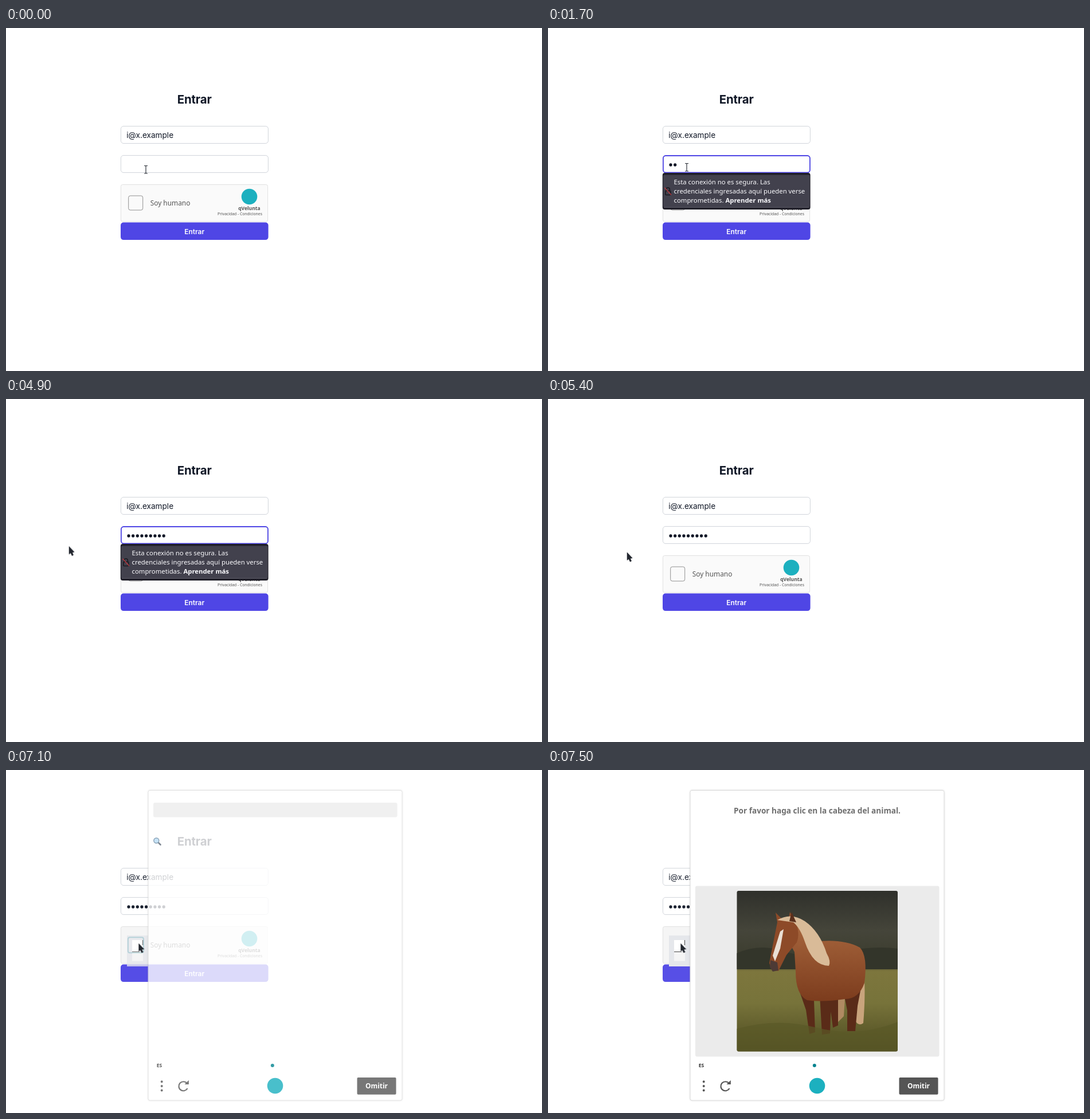
An HTML page that plays this animation: 935x599 px, repeating every 8000 ms.

```html
<!DOCTYPE html>
<html lang="es">
<head>
<meta charset="utf-8">
<title>Entrar</title>
<style>
html, body { margin: 0; width: 100%; height: 100%; overflow: hidden; background: #fff; }
svg { display: block; width: 935px; height: 599px; }
text { font-family: "Noto Sans", "Open Sans", sans-serif; }
.inter { font-family: Inter, "Liberation Sans", sans-serif; }
.bold { font-weight: 700; }
.mid { text-anchor: middle; }
.small { fill: #555; }
.field { fill: #fff; stroke: #d1d5db; }

/* One 8 s clock for every part; all changes are hard steps */
.anim { animation: 8s step-end -10ms infinite; }
#cover { animation-name: type; }
#caret { animation-name: caret; }
#ring { animation-name: ring; }
#tip { animation-name: tip; }
#ibeam { animation-name: ibeam; }
#arrow { animation-name: arrow; }
#widget { animation-name: hover; }
#check { animation-name: check; }
#pulse { animation-name: pulse; }
#modal { animation-name: modal; }
#loading { animation-name: loading; }
#task { animation-name: task; }

@keyframes type {
  0% { transform: none; }
  18.75% { transform: translateX(7.65px); }
  21.25% { transform: translateX(15.3px); }
  23.75% { transform: translateX(22.95px); }
  27.5% { transform: translateX(30.6px); }
  38.75% { transform: translateX(38.25px); }
  41.25% { transform: translateX(45.9px); }
  43.75% { transform: translateX(53.55px); }
  47.5% { transform: translateX(61.2px); }
  51.25%, 100% { transform: translateX(68.85px); }
}
@keyframes caret {
  0% { opacity: 0; transform: none; }
  6.25% { opacity: 1; transform: none; }
  18.75% { opacity: 1; transform: translateX(7.65px); }
  21.25% { opacity: 0; transform: translateX(15.3px); }
  23.75% { opacity: 1; transform: translateX(22.95px); }
  27.5% { opacity: 1; transform: translateX(30.6px); }
  37.5% { opacity: 0; transform: translateX(30.6px); }
  38.75% { opacity: 1; transform: translateX(38.25px); }
  41.25% { opacity: 1; transform: translateX(45.9px); }
  43.75% { opacity: 1; transform: translateX(53.55px); }
  47.5% { opacity: 1; transform: translateX(61.2px); }
  51.25% { opacity: 1; transform: translateX(68.85px); }
  52.5%, 100% { opacity: 0; transform: translateX(68.85px); }
}
@keyframes ring {
  0% { opacity: 0; }
  6.25% { opacity: 1; }
  63.75%, 100% { opacity: 0; }
}
@keyframes tip {
  0% { opacity: 0; }
  6.25% { opacity: .6; }
  7.5% { opacity: 1; }
  63.75%, 100% { opacity: 0; }
}
@keyframes ibeam {
  0% { opacity: 1; transform: translate(244px, 247px); }
  1.25% { opacity: 1; transform: translate(243px, 245px); }
  2.5% { opacity: 1; transform: translate(242px, 243px); }
  57.5% { opacity: 1; transform: translate(226px, 244px); }
  58.75%, 100% { opacity: 0; transform: translate(226px, 244px); }
}
@keyframes arrow {
  0% { opacity: 0; transform: translate(165px, 250px); }
  58.75% { opacity: 1; transform: translate(165px, 250px); }
  60% { opacity: 1; transform: translate(121px, 256px); }
  61.25% { opacity: 1; transform: translate(110px, 257.5px); }
  67.5% { opacity: 1; transform: translate(138px, 268px); }
  68.75% { opacity: 1; transform: translate(203px, 292px); }
  70%, 100% { opacity: 1; transform: translate(231.5px, 303px); }
}
@keyframes hover {
  0% { fill: #fafafa; }
  68.75%, 100% { fill: #f5f5f5; }
}
@keyframes check {
  0% { opacity: 0; }
  75%, 100% { opacity: 1; }
}
@keyframes pulse {
  0% { r: 0; }
  75% { r: 1px; }
  76.25% { r: 2.5px; }
  77.5% { r: 4.5px; }
  78.75% { r: 6.3px; }
  80% { r: 7.5px; }
  81.25% { r: 6.3px; }
  82.5% { r: 4.5px; }
  83.75% { r: 2.5px; }
  85% { r: 4.5px; }
  86.25%, 100% { r: 0; }
}
@keyframes modal {
  0% { opacity: 0; }
  86.25% { opacity: .25; }
  87.5% { opacity: .55; }
  88.75% { opacity: .8; }
  90% { opacity: .95; }
  91.25%, 100% { opacity: 1; }
}
@keyframes loading {
  0% { opacity: 1; }
  93.75%, 100% { opacity: 0; }
}
@keyframes task {
  0% { opacity: 0; }
  93.75%, 100% { opacity: 1; }
}
</style>
</head>
<body>
<svg viewBox="0 0 935 599">
  <defs>
    <linearGradient id="scene" x2="0" y2="1">
      <stop offset="0" stop-color="#2f302b"/>
      <stop offset=".25" stop-color="#45453a"/>
      <stop offset=".45" stop-color="#3a3b2c"/>
      <stop offset=".5" stop-color="#7d763d"/>
      <stop offset=".7" stop-color="#77733a"/>
      <stop offset="1" stop-color="#4c4a20"/>
    </linearGradient>
    <linearGradient id="coat" x2="0" y2="1">
      <stop offset="0" stop-color="#a9683f"/>
      <stop offset="1" stop-color="#7c3c1d"/>
    </linearGradient>
    <filter id="shade" x="-5%" y="-5%" width="110%" height="110%">
      <feDropShadow dx="0" dy="0" stdDeviation="1.5" flood-opacity=".12"/>
    </filter>
    <clipPath id="frame"><rect x="329.5" y="211" width="280.5" height="280.5" rx="3"/></clipPath>
  </defs>

  <!-- Form -->
  <text class="inter bold mid" x="328.7" y="131.5" font-size="20.4" fill="#111827" letter-spacing="-.1">Entrar</text>
  <rect class="field" x="200.4" y="171.5" width="257" height="30" rx="4.6"/>
  <text class="inter" x="210.2" y="191.6" font-size="13.6" fill="#111827">i@x.example</text>
  <rect class="field" x="200.4" y="222.5" width="257" height="30" rx="4.6"/>
  <rect id="ring" class="anim" x="200.9" y="223" width="256" height="29.3" rx="4.4" fill="#fff" stroke="#4f46e5" stroke-width="1.8"/>
  <path d="M214 239h62" stroke="#111827" stroke-width="5.3" stroke-linecap="round" stroke-dasharray="0 7.65"/>
  <rect id="cover" class="anim" x="210.2" y="234" width="70" height="10" fill="#fff"/>
  <rect id="caret" class="anim" x="210" y="230.5" width="1" height="15" fill="#111827"/>

  <!-- Check widget -->
  <rect id="widget" class="anim" x="200.4" y="273.5" width="256.2" height="64.5" rx="3" fill="#fafafa" stroke="#e0e0e0"/>
  <rect x="213.7" y="293" width="25" height="25" rx="3.2" fill="#fafafa" stroke="#919191"/>
  <g id="check" class="anim">
    <rect x="212.9" y="292.2" width="27" height="27" rx="3" fill="#fafafa" stroke="#00838f" stroke-width="2"/>
    <circle id="pulse" class="anim" cx="226.3" cy="305.6" r="0" fill="none" stroke="#f0a04b" stroke-width="1.2"/>
  </g>
  <text class="small" x="251.7" y="309.7" font-size="11.9">Soy humano</text>
  <circle cx="424.5" cy="294.5" r="13.8" fill="#1cb0bf"/>
  <text class="small bold mid" x="424.4" y="318" font-size="8.5">qVelunta</text>
  <text class="small mid" x="408" y="327.2" font-size="6.8">Privacidad - Condiciones</text>

  <rect x="200" y="339.5" width="257.6" height="30.6" rx="5" fill="#4f46e5"/>
  <text class="inter mid" x="328.7" y="359.8" font-size="11.9" font-weight="600" fill="#fff">Entrar</text>

  <!-- Warning -->
  <g id="tip" class="anim">
    <rect x="199.8" y="253" width="257.8" height="64" rx="4" fill="#1f1e28"/>
    <rect x="201" y="256.5" width="255.5" height="56.5" rx="2" fill="#42414d"/>
    <path d="M202 313.3h253.5" stroke="#6a6974" stroke-width=".8"/>
    <g fill="none" stroke="#1b1a20" stroke-width="1.6">
      <path d="M206.300 284v-2.200a3 3 0 0 1 6 0v2.200"/>
      <rect x="204.800" y="284.500" width="9" height="7" rx="1"/>
      <path d="M203.500 279l11.500 12.500" stroke="#b8383f" stroke-width="1.4"/>
    </g>
    <g font-size="11.33" fill="#fbfbfe">
      <text x="219.500" y="273.200">Esta conexión no es segura. Las</text>
      <text x="219.500" y="289.300">credenciales ingresadas aquí pueden verse</text>
      <text x="219.500" y="305.400">comprometidas. <tspan class="bold">Aprender más</tspan></text>
    </g>
  </g>

  <!-- Challenge -->
  <g id="modal" class="anim">
    <rect width="935" height="599" fill="#fff" opacity=".05"/>
    <rect x="211" y="289" width="40" height="54" fill="#e5e7eb"/>
    <rect x="220" y="297" width="19" height="20" fill="#fff"/>
    <rect x="220" y="318" width="19" height="15.500" fill="#f5f5f5"/>
    <path d="M220 317.500h13M238.500 297v9" stroke="#444"/>
    <rect x="248" y="35.500" width="443" height="541.500" rx="3" fill="#fff" stroke="#d7d7d7" filter="url(#shade)"/>

    <g id="loading" class="anim">
      <rect x="257" y="57" width="425.500" height="25.500" rx="3" fill="#ededed"/>
      <path d="M265.500 126.500l4 4" stroke="#5f6b78" stroke-width="2.600" stroke-linecap="round"/>
      <circle cx="262.300" cy="123.300" r="4.500" fill="#b9dcf4" stroke="#6d8ca6" stroke-width="1.400"/>
    </g>

    <g id="task" class="anim">
      <text class="bold mid" x="469.500" y="75.700" font-size="13.6" fill="#6f6f6f">Por favor haga clic en la cabeza del animal.</text>
      <rect x="257" y="202.500" width="425.500" height="298" rx="3" fill="#ebebeb"/>
      <g clip-path="url(#frame)">
        <rect x="329" y="211" width="281" height="281" fill="url(#scene)"/>
        <path d="M329 320q40-18 80-4t100 2 101-6v36H329z" fill="#33352a"/>
        <path d="M540 312q18 30 10 130-8 6-14-4 8-60-4-100z" fill="#c9a47c"/>
        <path d="M500 392l18 4-2 34-10 10z" fill="#b08a62"/>
        <path d="M440 390l24 12 2 56-10 3-6-42zM474 394l20 4-2 62-14 2zM490 398l16 0 0 48-9 4zM514 380l34-10-8 42-4 44-14 0 0-36z" fill="#5a2b18"/>
        <path d="M400 262l30 4 34 34q50-6 80 10 14 14 8 62-10 28-34 28-40 6-66 2-20-10-20-50l-2-34z" fill="url(#coat)"/>
        <path d="M400 266l-3-17 13 13 9 2 3-16 10 17q8 20 2 36l-18 22-14 28-12-2-4-12z" fill="#8d4a28"/>
        <path d="M405 282l6-4-6 34-9 22-4-10z" fill="#eadfd4"/>
        <path d="M388 332l12 4 2 14-10 2-5-8z" fill="#4d3a35"/>
        <path d="M400 262q24-14 48 2 26 18 38 56 8 14 4 22-28 0-42-42-8-24-20-34z" fill="#d9bb98"/>
        <path d="M421 264l4-16 8 18z" fill="#5a2f1c"/>
        <path d="M329 452q70-20 140-2t141-10v52H329z" fill="#5b5927" opacity=".7"/>
      </g>
    </g>

    <text class="bold" x="262.800" y="518.800" font-size="8.5" fill="#333">ES</text>
    <circle cx="464.800" cy="516" r="3" fill="#00838f"/>
    <path d="M271.700 544.300v16" stroke="#555" stroke-width="4" stroke-linecap="round" stroke-dasharray="0 7.600"/>
    <path d="M315.500 547a8 8 0 1 0 1 9" fill="none" stroke="#555" stroke-width="2.200"/>
    <path d="M318.800 541.800v7.200h-7.200z" fill="#555"/>
    <circle cx="469.500" cy="551.500" r="13.800" fill="#1cb0bf"/>
    <rect x="612.500" y="537" width="68" height="29.700" rx="1.800" fill="#555"/>
    <text class="bold mid" x="646.500" y="556" font-size="11.9" fill="#fff">Omitir</text>
  </g>

  <!-- Pointers -->
  <path id="ibeam" class="anim" d="M-3-6.500h2.200l.8.800.8-.800h2.200M0-6v12.500M-3 7h2.200l.8-.800.8.800h2.200" fill="none" stroke="#30343c" stroke-width="1.200"/>
  <path id="arrow" class="anim" d="M0 0v13.500l2.800-2 2.400 4.700 2.400-1.200-2-4.600 3.600-.600z" fill="#23272f" stroke="#23272f" stroke-width=".5" stroke-linejoin="round"/>
</svg>
</body>
</html>
```
